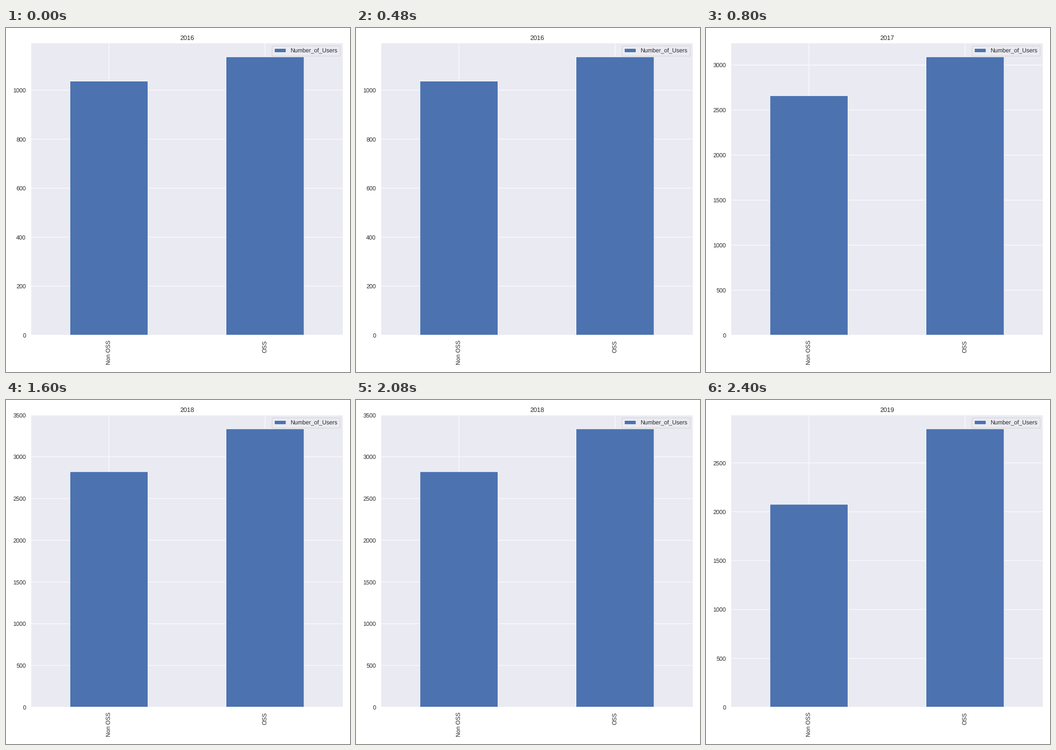
Write a matplotlib script that moves like this. It is 748x748 px and loops after 3200 ms.

```python
import matplotlib.pyplot as plt
import numpy as np
from matplotlib.animation import FuncAnimation

SIZE, DPI = 748, 88
PT = SIZE / 9 / DPI  # point sizes as on a nine inch figure
INK, PANEL, BLUE = "#262626", "#EAEAF2", "#4C72B0"

# year: (non OSS users, OSS users, tick step)
USERS = {
    2016: (1037, 1136, 200),
    2017: (2660, 3091, 500),
    2018: (2822, 3335, 500),
    2019: (2076, 2848, 500),
}
YEARS = list(USERS)

plt.rcParams.update({
    "font.family": "Liberation Sans",
    "text.color": INK,
    "text.hinting": "none",
    "path.snap": False,  # keep edges and grid lines at subpixel places
    "axes.facecolor": PANEL,
    "axes.edgecolor": "white",
    "axes.linewidth": 1.25 * PT,
    "axes.axisbelow": True,
    "axes.titlesize": 12 * PT,
    "axes.titlepad": 6 * PT,
    "grid.color": "white",
    "grid.linewidth": PT,
    "legend.fontsize": 11 * PT,
    "patch.linewidth": PT,
})

fig = plt.figure(figsize=(SIZE / DPI, SIZE / DPI), dpi=DPI, facecolor="white")
left, right, top, bottom = 54.2, 733, 32.5, 668
ax = fig.add_axes([left / SIZE, 1 - bottom / SIZE,
                   (right - left) / SIZE, (bottom - top) / SIZE])

bars = ax.bar([0, 1], [0, 0], width=0.5, color=BLUE, edgecolor="white",
              linewidth=PT, label="Number_of_Users")
ax.set_xlim(-0.5, 1.5)
ax.set_xticks([0, 1], ["Non OSS", "OSS"], rotation=90)
ax.tick_params(length=0, pad=9.5 * PT, labelsize=11 * PT, labelcolor=INK)
ax.grid(True)
ax.legend(loc="upper right", facecolor=PANEL, edgecolor="0.8", framealpha=0.8)
title = ax.set_title("")


def update(i):
    year = YEARS[i % len(YEARS)]
    *counts, step = USERS[year]
    for bar, count in zip(bars, counts):
        bar.set_height(count)
    limit = 1.05 * max(counts)
    ax.set_yticks(np.arange(0, limit, step))
    ax.set_ylim(0, limit)
    title.set_text(str(year))
    return [*bars, title]


anim = FuncAnimation(fig, update, frames=len(YEARS), interval=800,
                     repeat=True, repeat_delay=0, blit=False)
plt.show()
```
